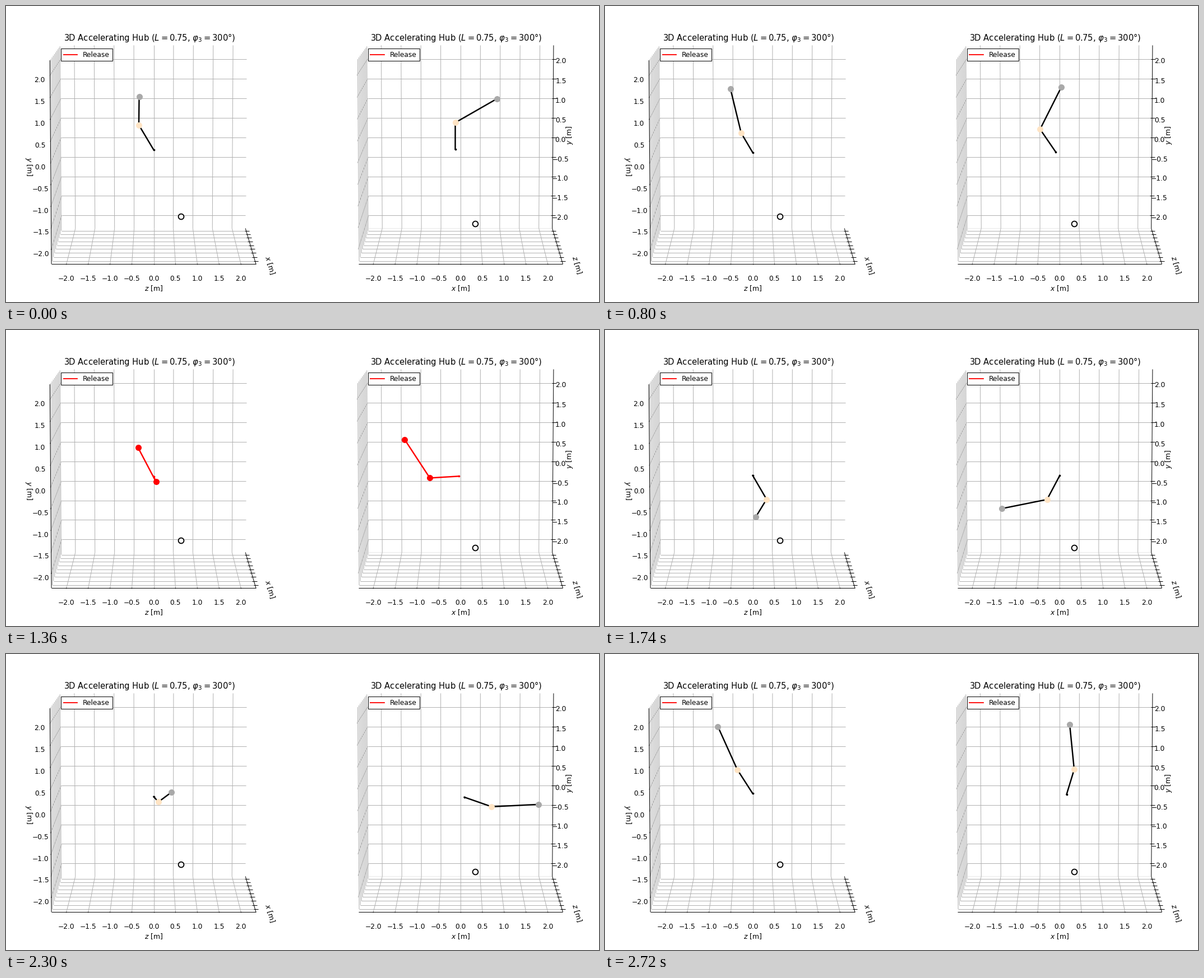
A matplotlib script for the animation above (2740 ms loop, 1058 by 529 pixels).

```python
import numpy as np
import matplotlib.pyplot as plt
from matplotlib.animation import FuncAnimation
from matplotlib.collections import LineCollection
from matplotlib.patches import Rectangle

W, H, DPI = 1058, 529, 64
FRAMES, STEP = 137, 20
PT = W / 12 / DPI                 # one design point in figure points
EM = 10 * W / 12 / 72             # label size in pixels

# camera: perspective view of a cube from slightly above
EDGE = 2.34375                    # half side of the cube in metres
UNIT = 0.5501 / EDGE
FOCAL, DIST, MID_Y = 3159.4, 10, 256.5
COS, SIN = np.cos(np.radians(7.5)), np.sin(np.radians(7.5))
TICKS = np.arange(-2, 2.1, 0.5)
OUT, IN = 0.075, 0.0375

# arm: upper link turns in a tilted plane, lower link is free after release
LINK1, LINK2 = 0.70, 1.157
TILT = np.radians(30)
RELEASE, SPIN_UP = 1.36, 51.25
RELEASE_RATE = 2 * SPIN_UP * RELEASE
TARGET = (0.347, -1.694, 0.669)


def project(cx, u, v, w):
    """Pixel position of a point: u right, v up, w towards the viewer."""
    depth = DIST - UNIT * (w * COS + v * SIN)
    scale = FOCAL * UNIT / depth
    return cx + scale * u, MID_Y - scale * (v * COS - w * SIN)


def hermite(t, knots):
    """Cubic curve through (time, value, slope) knots."""
    ts, ys, ms = np.array(knots).T
    i = int(np.clip(np.searchsorted(ts, t, side="right") - 1, 0, len(ts) - 2))
    h = ts[i + 1] - ts[i]
    s = (t - ts[i]) / h
    return ((1 + 2 * s) * (1 - s) ** 2 * ys[i] + s * (1 - s) ** 2 * h * ms[i]
            + s * s * (3 - 2 * s) * ys[i + 1] + s * s * (s - 1) * h * ms[i + 1])


UPPER = [(RELEASE, 184.8, RELEASE_RATE), (1.74, 244.2, 164),
         (2.3, 339.5, 188), (2.72, 434.6, 265)]
LOWER = [(RELEASE, 124.8, RELEASE_RATE), (1.74, 193.4, 225),
         (2.16, 316.2, 345), (2.3, 365.2, 325), (2.72, 455.8, 140)]
LOWER_Z = [(0, 0, 0), (0.5, -0.133, -0.35), (1.1, -0.302, -0.26),
           (1.36, -0.361, -0.05), (1.74, -0.227, 0.8), (2.16, 0.32, 0.6),
           (2.3, 0.288, -0.9), (2.72, -0.401, -1.3)]
UPPER_N = [(0, -0.01, 0.06), (0.5, 0.018, 0.05), (1.1, 0.044, 0.02),
           (1.36, 0.043, -0.02), (1.74, 0.028, -0.05),
           (2.3, -0.011, -0.09), (2.72, -0.06, -0.12)]


def arm(t):
    """Hub, elbow and tip in metres (rows: x, y, z)."""
    hub = np.array([-0.128 + 0.0185 * t + 0.0333 * t * t,
                    -0.068 + 0.058 * (t - 1.15) ** 2, 0])
    if t < RELEASE:
        theta, alpha = 90 + SPIN_UP * t * t, 30 + SPIN_UP * t * t
    else:
        theta, alpha = hermite(t, UPPER), hermite(t, LOWER)
    theta, alpha = np.radians(theta), np.radians(alpha)

    n = hermite(t, UPPER_N)
    flat = np.sqrt(1 - n * n)
    ct, st = np.cos(TILT), np.sin(TILT)
    up = flat * np.sin(theta)
    elbow = hub + LINK1 * np.array([flat * np.cos(theta),
                                    up * ct + n * st, -up * st + n * ct])

    z = hermite(t, LOWER_Z)
    flat = np.sqrt(1 - z * z)
    tip = elbow + LINK2 * np.array([flat * np.cos(alpha),
                                    flat * np.sin(alpha), z])
    return np.array([hub, elbow, tip]).T


def side_view(x, y, z):
    return z, y, -x


def front_view(x, y, z):
    return x, y, z


fig = plt.figure(figsize=(W / DPI, H / DPI), dpi=DPI, facecolor="white")
ax = fig.add_axes([0, 0, 1, 1])
ax.set_xlim(0, W)
ax.set_ylim(H, 0)
ax.axis("off")


def segments(cx, ends, color, zorder):
    lines = [[project(cx, *a), project(cx, *b)] for a, b in ends]
    ax.add_collection(LineCollection(lines, colors=color,
                                     linewidths=0.8 * PT, zorder=zorder))


def number(x, y, value):
    ax.text(x, y + 0.365 * EM, f"{value:.1f}".replace("-", "\u2212"),
            size=10 * PT, ha="center", va="baseline", zorder=4)


def axis_name(x, y, name, angle=0):
    ax.text(x, y, f"${name}$ [m]", size=10 * PT, rotation=angle,
            ha="center", va="center", zorder=4)


def legend(x, y):
    ax.add_patch(Rectangle((x, y), 7.55 * EM, 22, facecolor="white",
                           edgecolor="black", linewidth=0.8 * PT, zorder=7))
    ax.plot([x + 0.4 * EM, x + 2.4 * EM], [y + 10.3] * 2, color="red",
            linewidth=1.5 * PT, zorder=8)
    ax.text(x + 3.2 * EM, y + 15, "Release", size=10 * PT,
            va="baseline", zorder=8)


def dot(size, zorder, **style):
    return ax.plot([], [], "o", markersize=size * PT, zorder=zorder,
                   **{"markeredgewidth": PT, **style})[0]


class Panel:
    def __init__(self, cx, title_x, view, names, spine_right):
        self.cx, self.view = cx, view
        self.draw_box(spine_right)
        self.draw_text(title_x, names, spine_right)
        legend(title_x - 158, 76.2)
        target = dot(8, 5, color="black", markerfacecolor="white",
                     markeredgewidth=1.5 * PT)
        px, py = project(cx, *view(*TARGET))
        target.set_data([px], [py])
        self.links = ax.plot([], [], color="black", linewidth=2 * PT,
                             zorder=5, solid_joinstyle="round")[0]
        self.hub = dot(2, 5.1, color="black")
        self.elbow = dot(8, 5.2, color="bisque")
        self.tip = dot(8, 5.3, color="darkgray")

    def draw_box(self, spine_right):
        e = EDGE
        grid = []
        for k in TICKS:
            grid += [((k, -e, -e), (k, e, -e)), ((-e, k, -e), (e, k, -e)),
                     ((-e, -e, k), (e, -e, k)), ((k, -e, -e), (k, -e, e)),
                     ((-e, -e, k), (-e, e, k)), ((-e, k, -e), (-e, k, e))]
        segments(self.cx, grid, "#b0b0b0", 1)

        axes = [((-e, -e, e), (e, -e, e)), ((e, -e, -e), (e, -e, e))]
        for k in TICKS:
            axes += [((k, -e, e - IN), (k, -e, e + OUT)),
                     ((e - IN, -e, k), (e + OUT, -e, k))]
        if spine_right:
            segments(self.cx, [((-e, -e, -e), (e, -e, -e))], "#e8e8e8", 0.5)
            axes.append(((e, -e, -e), (e, e, -e)))
            axes += [((e - IN, k, -e), (e + OUT, k, -e)) for k in TICKS]
        else:
            axes.append(((-e, -e, e), (-e, e, e)))
            axes += [((-e, k, e - IN), (-e, k, e + OUT)) for k in TICKS]
        segments(self.cx, axes, "black", 3)

    def draw_text(self, title_x, names, spine_right):
        e, cx = EDGE, self.cx
        for k in TICKS:
            number(project(cx, k, -e, e)[0], 487, k)
            if spine_right:
                x, y = project(cx, e, k, -e)
                number(x + 13.5, y + 3.3, k)
            else:
                x, y = project(cx, -e, k, e)
                number(x - 18.5, y + 7.4, k)
        axis_name(cx - 0.3, 505, names[0])
        axis_name(cx + 207.5, 463, names[1], -73.8)
        if spine_right:
            axis_name(cx + 194.5, 231, "y", 89.6)
        else:
            axis_name(cx - 223, 286.5, "y", -89.5)
        ax.text(title_x, 62,
                r"3D Accelerating Hub ($L=0.75$, $\varphi_3=300$°)",
                size=12 * PT, ha="center", va="baseline", zorder=4)

    def pose(self, points, released):
        px, py = project(self.cx, *self.view(*points))
        self.links.set_data(px, py)
        parts = (self.hub, self.elbow, self.tip)
        for part, x, y in zip(parts, px, py):
            part.set_data([x], [y])
        colors = ("black", "black", "bisque", "darkgray")
        for part, color in zip((self.links, *parts), colors):
            part.set_color("red" if released else color)


panels = [Panel(263.5, 256, side_view, "zx", False),
          Panel(811, 803.5, front_view, "xz", True)]


def update(i):
    t = i * STEP / 1000
    points = arm(t)
    for panel in panels:
        panel.pose(points, i == round(RELEASE * 1000 / STEP))
    return []


anim = FuncAnimation(fig, update, frames=FRAMES, interval=STEP,
                     repeat=True, repeat_delay=0, blit=False)
plt.show()
```
